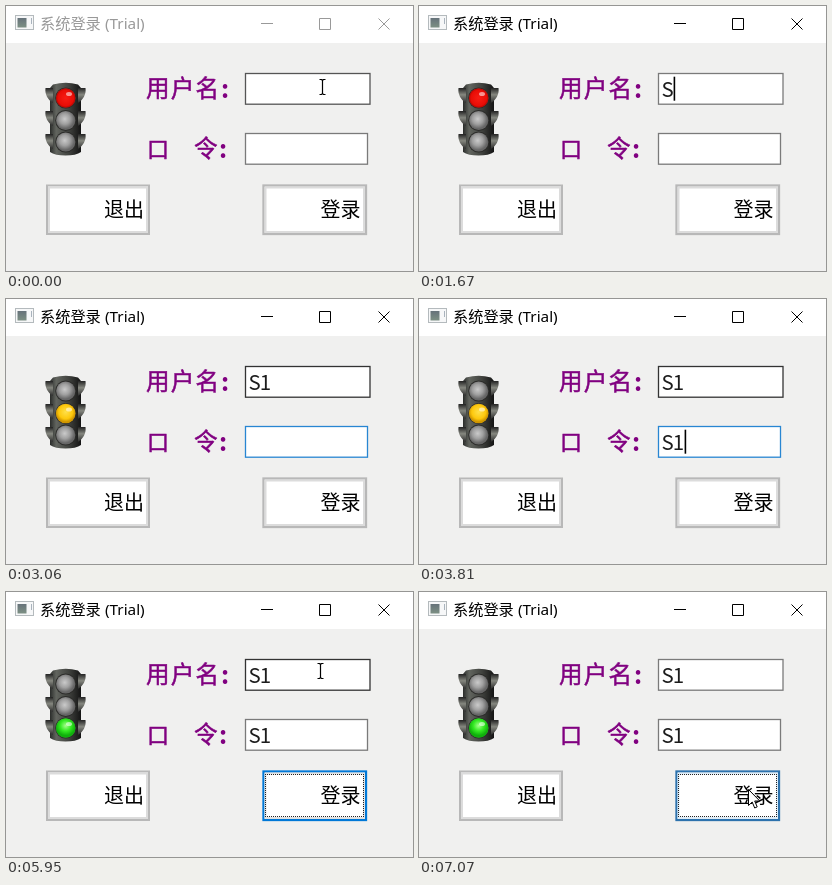
An HTML page that plays this animation: 407 by 265 pixels, repeating every 7630 ms.

```html
<!DOCTYPE html>
<html lang="zh-CN">
<head>
<meta charset="utf-8">
<title>系统登录</title>
<style>
  html, body { margin: 0; width: 100%; height: 100%; overflow: hidden; background: #f0f0ef; }
  svg { display: block; width: 407px; height: 265px; }
  text { font-family: "Noto Sans CJK SC", "Noto Sans CJK", sans-serif; }
  .title { font-size: 15.2px; }
  .title .latin { font-family: "Noto Sans", sans-serif; font-size: 15.3px; }
  .label { font-size: 23.5px; letter-spacing: 1.3px; fill: #800080; stroke: #800080; stroke-width: .5; }
  .colon { font-size: 25px; font-weight: 700; stroke: none; }
  .entry { font-family: "DejaVu Sans Condensed", "DejaVu Sans", sans-serif; font-stretch: condensed; font-size: 20.5px; fill: #1c1c1c; }
  .button { font-size: 20px; font-weight: 300; text-anchor: end; fill: #000; }
  .field { fill: #fff; stroke: #7a7a7a; stroke-width: 1.3; }
</style>
</head>
<body>
<svg viewBox="0 0 407 265">
  <defs>
    <linearGradient id="body">
      <stop offset="0" stop-color="#2a2c2a"/><stop offset=".2" stop-color="#62655f"/>
      <stop offset=".6" stop-color="#41433f"/><stop offset="1" stop-color="#141414"/>
    </linearGradient>
    <linearGradient id="flap" x2="0" y2="1">
      <stop offset="0" stop-color="#222"/><stop offset=".45" stop-color="#85877f"/><stop offset="1" stop-color="#2c2c2c"/>
    </linearGradient>
    <radialGradient id="off" cx=".45" cy=".42">
      <stop offset="0" stop-color="#cacaca"/><stop offset=".55" stop-color="#a0a0a0"/><stop offset="1" stop-color="#666"/>
    </radialGradient>
    <radialGradient id="red" cx=".5" cy=".5">
      <stop offset="0" stop-color="#f81c14"/><stop offset=".8" stop-color="#e80d06"/><stop offset="1" stop-color="#b00400"/>
    </radialGradient>
    <radialGradient id="yellow" cx=".5" cy=".42">
      <stop offset="0" stop-color="#ffe04a"/><stop offset=".7" stop-color="#fdc80c"/><stop offset="1" stop-color="#d09600"/>
    </radialGradient>
    <radialGradient id="green" cx=".5" cy=".38">
      <stop offset="0" stop-color="#a6ff8e"/><stop offset=".55" stop-color="#34ea22"/><stop offset="1" stop-color="#10b00c"/>
    </radialGradient>
    <linearGradient id="pane" x2="0" y2="1">
      <stop offset="0" stop-color="#66727a"/><stop offset="1" stop-color="#7d9084"/>
    </linearGradient>
    <path id="visor" d="M47 82H39.500C38.500 88 42 94 47 97ZM72 82H79.500C80.500 88 77 94 72 97Z" fill="url(#flap)"/>
  </defs>

  <rect width="407" height="265" fill="#f0f0ef"/>
  <rect width="407" height="37" fill="#fff"/>
  <rect x="9.500" y="9.500" width="18" height="14" fill="#f6f7f8" stroke="#b4babd"/>
  <rect x="11.500" y="12" width="9" height="9.500" fill="url(#pane)"/>
  <path d="M25.500 12V18" stroke="#a9b3bd"/>
  <g id="caption" class="title">
    <text x="34" y="23">系统登录</text><text class="latin" x="99" y="23">(Trial)</text>
  </g>
  <path id="controls" d="M255 17.500H267M313.500 12.500H324.500V23.500H313.500ZM372.500 12.500L383.500 23.500M383.500 12.500L372.500 23.500" fill="none"/>

  <path d="M47 78.500Q60 75 72 78.500L75 82V146Q70 149.500 59.500 149.500T44 146V82Z" fill="url(#body)"/>
  <use href="#visor"/><use href="#visor" y="23"/><use href="#visor" y="46"/>
  <g id="lamps"></g>

  <g class="label">
    <text x="140" y="91">用户名</text><text class="colon" x="215" y="92">:</text>
    <text x="141" y="151" font-size="22">口</text><text x="188" y="151">令</text><text class="colon" x="213" y="151.500">:</text>
  </g>

  <rect id="userBox" class="field" x="239.500" y="67.500" width="124.500" height="30.700"/>
  <rect id="passBox" class="field" x="239.500" y="127.500" width="122" height="30.700"/>
  <g class="entry">
    <text id="userS" x="242.500" y="91">S</text><text id="user1" x="253.700" y="91">1</text>
    <text id="passS" x="242.500" y="151">S</text><text id="pass1" x="253.700" y="151">1</text>
  </g>
  <rect id="caret" x="242.600" y="70.700" width="1.600" height="24"/>

  <g id="quit">
    <rect x="41" y="179.500" width="102" height="48.500" fill="#fff" stroke="#b8b8b8" stroke-width="2"/>
    <rect x="43" y="181.500" width="98" height="44.500" fill="#fff" stroke="#dcdcdc" stroke-width="2"/>
    <text class="button" x="138" y="211">退出</text>
  </g>
  <g id="login">
    <rect id="loginEdge" x="257.500" y="179.500" width="102.500" height="48.500" fill="#fff" stroke-width="2.300"/>
    <rect id="loginInner" x="259.500" y="181.500" width="98.500" height="44.500" fill="#fff" stroke-width="2"/>
    <rect id="focusRing" x="259.500" y="182.500" width="98" height="42" fill="none" stroke="#222"
      stroke-dasharray="1 1" stroke-dashoffset=".5" shape-rendering="crispEdges"/>
    <text class="button" x="354.500" y="211">登录</text>
  </g>

  <g id="pointer">
    <path id="beam" d="M-2.500 -7.500H-.5L.5 -6.500L1.500 -7.500H3.500M.5 -6.500V6.500M-2.500 7.500H-.5L.5 6.500L1.500 7.500H3.500" fill="none" stroke="#000" stroke-width="1.200"/>
    <path id="arrow" d="M.5 .5V16.500L4.200 13L6.700 19L9.200 17.900L6.700 12H11.800Z" fill="#fff" stroke="#000"/>
  </g>
</svg>
<script>
const LOOP = 7630;
const byId = id => document.getElementById(id);

// Each step is [start ms, value]; a value holds until the next step.
function play(id, property, steps) {
  const frames = steps.map(([time, value]) => ({ offset: time / LOOP, [property]: value, easing: "step-end" }));
  frames.push({ offset: 1, [property]: steps.at(-1)[1] });
  byId(id).animate(frames, { duration: LOOP, iterations: Infinity });
}
const show = (id, ...steps) => play(id, "opacity", steps);
// Whole pixels keep the one-pixel lines sharp.
const at = (x, y) => `translate(${x}px, ${y}px)`;

const lamps = [["red", 92], ["yellow", 114.5], ["green", 136]];
byId("lamps").innerHTML = lamps.map(([color, y]) => `
  <circle cx="59.700" cy="${y}" r="10.500" fill="#2c2c2a"/>
  <circle cx="59.700" cy="${y}" r="9.600" fill="url(#off)"/>
  <g id="${color}Lamp"><circle cx="59.700" cy="${y}" r="9.800" fill="url(#${color})"/>
  <ellipse cx="63" cy="${y - 4}" rx="3" ry="2" fill="#fff" opacity=".55"/></g>`).join("");

const YELLOW = 2410, GREEN = 4370;
show("redLamp", [0, 1], [YELLOW, 0]);
show("yellowLamp", [0, 0], [YELLOW, 1], [GREEN, 0]);
show("greenLamp", [0, 0], [GREEN, 1]);

play("caption", "fill", [[0, "#999"], [190, "#000"]]);
play("controls", "stroke", [[0, "#999"], [190, "#000"]]);

play("userBox", "stroke", [[0, "#555"], [190, "#666"], [370, "#7a7a7a"], [2410, "#3c73a8"],
  [2500, "#35506b"], [2600, "#333"], [6600, "#555"], [6700, "#7a7a7a"]]);
play("passBox", "stroke", [[0, "#7a7a7a"], [2410, "#5c8fb8"], [2500, "#3f8fcf"], [2600, "#2886d2"],
  [4460, "#4b8fc4"], [4560, "#6a8296"], [4650, "#7a7a7a"], [6700, "#444"], [6790, "#7a7a7a"]]);

show("userS", [0, 0], [1670, 1]);
show("user1", [0, 0], [1950, 1]);
show("passS", [0, 0], [3530, 1]);
show("pass1", [0, 0], [3810, 1]);
show("caret", [0, 0], [280, 1], [1020, 0], [1580, 1], [3060, 0], [3530, 1], [GREEN, 0]);
play("caret", "transform", [[0, at(0, 0)], [1670, at(12, 0)], [1950, at(23, 0)],
  [2410, at(0, 60)], [3530, at(12, 60)], [3810, at(23, 60)]]);

play("loginEdge", "stroke", [[0, "#b8b8b8"], [GREEN, "#6b9cc8"], [4460, "#0078d7"], [6880, "#1a75bd"], [6980, "#2d72ad"]]);
play("loginInner", "stroke", [[0, "#dcdcdc"], [GREEN, "#e3e3e3"], [6880, "#e0edf7"]]);
show("focusRing", [0, 0], [GREEN, 1]);

show("pointer", [0, 1], [1670, 0], [5950, 1]);
show("beam", [0, 1], [6600, 0], [6700, 1], [6790, 0]);
show("arrow", [0, 0], [6600, 1], [6700, 0], [6790, 1]);
play("pointer", "transform", [[0, at(316, 81)], [100, at(315, 80)], [190, at(313, 79)],
  [5950, at(314, 79)], [6510, at(327, 87)], [6600, at(345, 107)], [6700, at(356, 137)],
  [6790, at(359, 165)], [6880, at(351, 184)], [6980, at(338, 194)], [7070, at(329, 197)]]);
</script>
</body>
</html>
```
